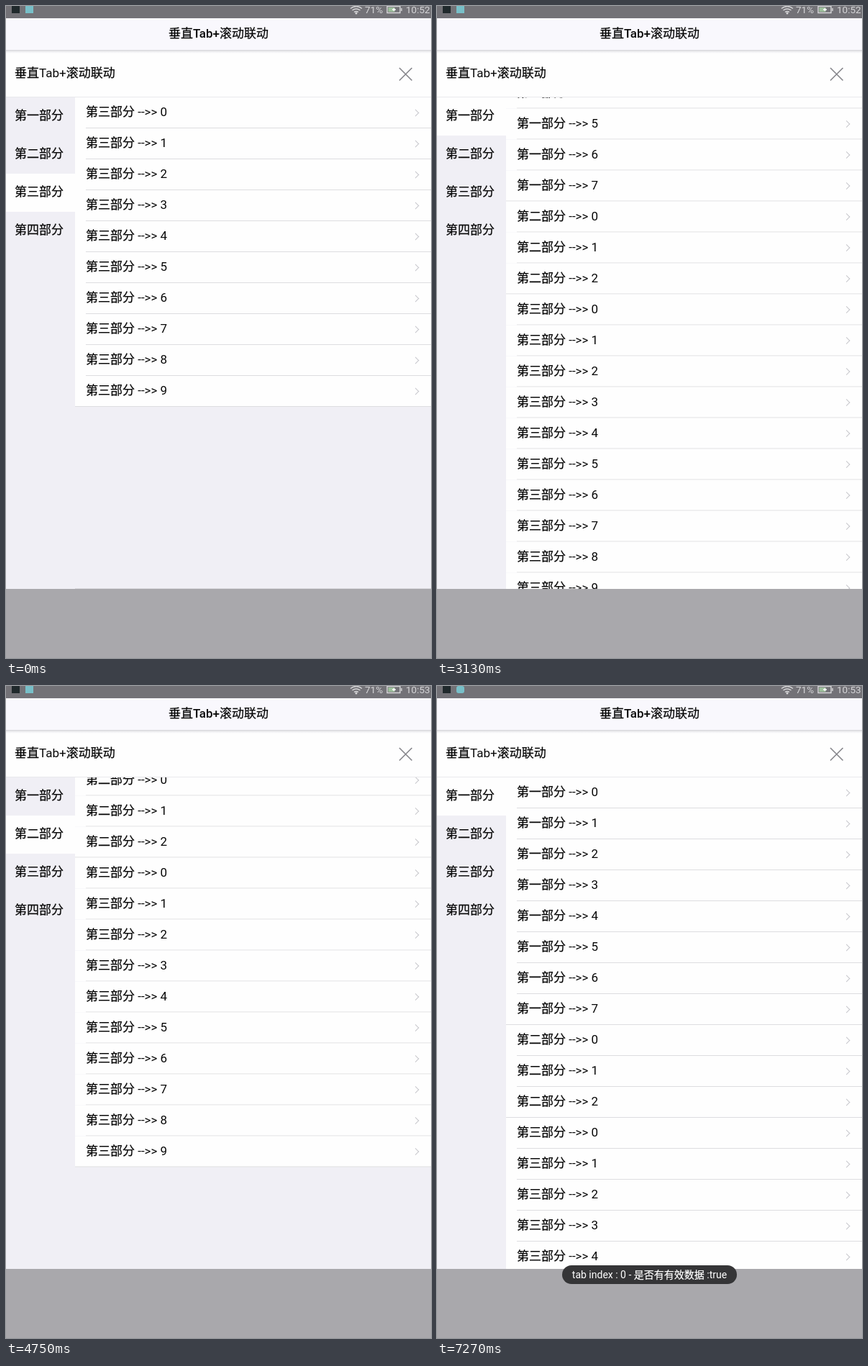
Animation of 591x906 px, one loop 8000 ms. Source, as an HTML page:

```html
<!DOCTYPE html>
<html lang="zh-CN">
<head>
<meta charset="utf-8">
<style>
html, body { margin: 0; width: 100%; height: 100%; overflow: hidden; }
body { position: relative; background: #f0eff5; color: #080808; font: 17px Roboto, "Noto Sans CJK SC", "Noto Sans CJK", sans-serif; white-space: nowrap; }
body > *, .status > * { position: absolute; }
b { font-weight: inherit; -webkit-text-stroke: .25px; }
.status { left: 0; top: 0; width: 591px; height: 17px; background: #737277; color: #d6d6d8; font-size: 13.5px; line-height: 11px; }
.status > * { top: 0; }
.status svg { left: 0; }
.status i { width: 11px; height: 10px; }
.title { left: 0; top: 17px; width: 591px; height: 44px; line-height: 42px; text-align: center; font-weight: 500; background: #f9f8fd; }
.head { left: 0; top: 61px; width: 591px; height: 65px; line-height: 64px; text-indent: 12px; border-bottom: 1px solid #e9e9ec; background: linear-gradient(#d5d5d9, #f3f3f5 3px, #fefefe 5px); }
.close { left: 546px; top: 85px; }
.tabs { left: 0; top: 127px; width: 96px; }
.tabs div { height: 53px; line-height: 51px; text-indent: 12px; }
.tabs .on { background: #fefefe; }
.view { left: 96px; top: 127px; width: 495px; height: 683px; overflow: hidden; }
.list { height: 1155px; border-bottom: 1px solid #d9d8dd; }
.row { position: relative; height: 43px; line-height: 40px; padding-left: 15px; background: #fefefe; }
.row::before { content: ""; position: absolute; left: 15px; right: 0; top: 42px; height: 1px; background: #dddde0; }
.row.last::before { left: 0; }
.row::after { content: ""; position: absolute; left: 470px; top: 18px; width: 7px; height: 7px; border: solid #c7c7cc; border-width: 1.4px 1.4px 0 0; box-sizing: border-box; transform: rotate(45deg); }
.foot { left: 0; top: 810px; width: 591px; height: 96px; background: #a9a8ac; }
.toast { left: 174px; top: 805px; width: 243px; height: 26px; line-height: 27px; border-radius: 13px; text-align: center; font-size: 14px; color: #fff; background: #353537; }
</style>
</head>
<body>
<div class="status">
  <i style="left:8px;background:#20292c"></i>
  <i id="app" style="left:27px;background:#78bfc8"></i>
  <svg width="591" height="17" fill="none" stroke="#d6d6d8" stroke-width="1.4">
    <path d="M479 3.5q8-6 16 0M481.500 6q5.500-4 11 0M484 8.500q3-2 6 0"/>
    <circle cx="487" cy="10" r=".8"/>
    <path d="M530 .5h18v9h-18zM550 3v4"/>
    <path d="M531.500 2h9v6h-9z" fill="#9dbf9b" stroke="none"/>
    <path d="M537 5h5M539.500 3v4" stroke="#fff"/>
  </svg>
  <span style="left:499px">71%</span>
  <span id="clock" style="left:556px"></span>
</div>
<div class="head"><b>垂直</b>Tab+<b>滚动联动</b></div>
<div class="title"><b>垂直</b>Tab+<b>滚动联动</b></div>
<svg class="close" width="20" height="20" stroke="#85858a" stroke-width="1.6"><path d="M1 1L18.500 18.500M18.500 1L1 18.500"/></svg>
<div class="tabs"></div>
<div class="view"><div class="list"></div></div>
<div class="foot"></div>
<div class="toast">tab index : 0 - <b>是否有有效数据</b> :true</div>
<script>
const $ = q => document.querySelector(q);
const LOOP = 8000, ROW = 43;
const names = [..."一二三四"].map(n => `<b>第${n}部分</b>`);
const counts = [8, 3, 10, 0];

$(".tabs").innerHTML = names.map(n => `<div>${n}</div>`).join("");
$(".list").innerHTML = names.map((name, i) =>
  Array.from({ length: counts[i] }, (_, k) =>
    `<div class="row${k == counts[i] - 1 ? " last" : ""}">${name} --&gt;&gt; ${k}</div>`).join("")).join("");
const tabs = [...$(".tabs").children];

const linear = p => p;
const out = p => 1 - (1 - p) ** 2;
const smooth = p => p * p * (3 - 2 * p);

// start, end, steps, scroll position reached, easing
const moves = [
  [640, 1030, 6, 0, smooth],
  [2030, 2350, 5, 103.5, linear],
  [2430, 2820, 6, 165, out],
  [2900, 3130, 4, 199.5, linear],
  [3190, 3680, 7, 281, smooth],
  [3750, 3960, 4, 317, out],
  [4280, 4360, 2, 331, linear],
  [4450, 5020, 8, 392, smooth],
  [5170, 5310, 3, 396, linear],
  [5410, 5560, 3, 473, out],
  [6870, 7270, 6, 0, smooth]
];

function scrollAt(t) {
  let s = 473;
  for (const [start, end, steps, to, ease] of moves) {
    if (t < start) break;
    const k = Math.floor((t - start + 3) / (end - start) * (steps - 1)) + 1;
    s += (to - s) * ease(Math.min(1, k / steps));
  }
  return s;
}

function draw(t) {
  const s = scrollAt(t);
  const active = s < 8 * ROW ? 0 : s < 11 * ROW ? 1 : 2;
  $(".list").style.transform = `translateY(${-s}px)`;
  tabs.forEach((tab, i) => tab.classList.toggle("on", i == active));
  $("#clock").textContent = t < 4450 ? "10:52" : "10:53";
  $("#app").style.borderRadius = t < 5170 ? "0" : "3px";
  $(".toast").style.opacity = Math.max(0, Math.min(1, (t - 7110) / 150));
}

const began = performance.now();
function tick() {
  draw((performance.now() - began) % LOOP);
  requestAnimationFrame(tick);
}
tick();
</script>
</body>
</html>
```
